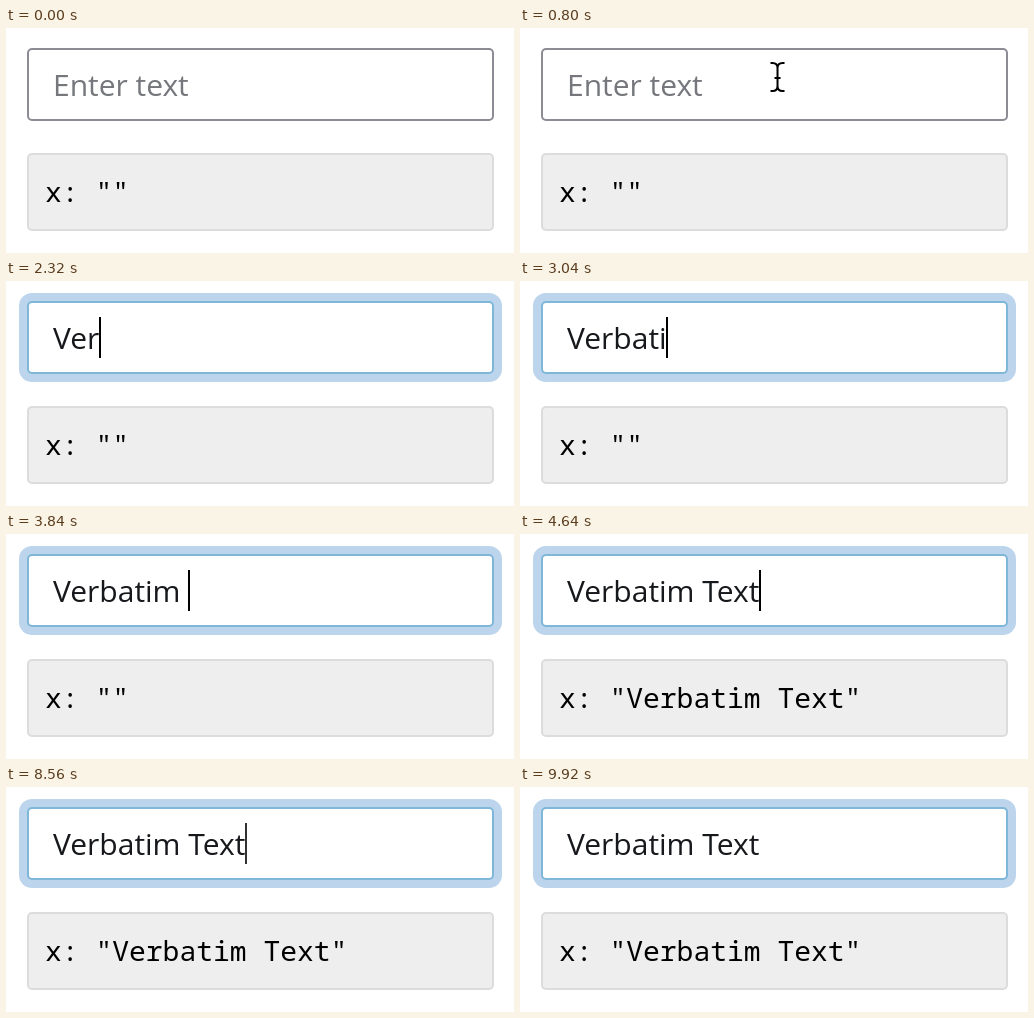
An HTML page with a canvas for the animation above (10 s loop, 508 by 225 pixels).

```html
<!DOCTYPE html>
<html lang="en">
<head>
<meta charset="utf-8">
<title>Text input demo</title>
<style>
  html, body { margin: 0; width: 100%; height: 100%; overflow: hidden; background: #fff; }
  canvas { display: block; }
</style>
</head>
<body>
<canvas id="stage" width="508" height="225"></canvas>
<script>
const c = document.getElementById('stage').getContext('2d');
const LOOP = 10000, TEXT = 'Verbatim Text';
const KEYS = [1920, 2080, 2240, 2400, 2640, 2880, 3040, 3280, 3520, 3920, 4080, 4160, 4320];
const FOCUS = 1270, OUTPUT = 4560, LEFT = 47;
const SANS = '30px "Open Sans", "Noto Sans", sans-serif';
const MONO = '28px "Noto Sans Mono", "DejaVu Sans Mono", monospace';

const clamp = v => Math.max(0, Math.min(1, v));
const ramp = (t, start, end) => clamp((t - start) / (end - start));
const smooth = p => p * p * (3 - 2 * p);
const mix = (a, b, p) => a.map((v, i) => Math.round(v + (b[i] - v) * p));
const bezier = (p, a, b, d, e) => {
  const q = 1 - p;
  return q * q * q * a + 3 * q * q * p * b + 3 * q * p * p * d + p * p * p * e;
};

function box(x, y, w, h, r, fill) {
  c.fillStyle = fill;
  c.beginPath();
  c.roundRect(x, y, w, h, r);
  c.fill();
}

function framed(y, h, border, fill) {
  box(21, y, 467, h, 5, border);
  box(23, y + 2, 463, h - 4, 3, fill);
}

function write(text, x, y, font, color) {
  c.font = font;
  c.fillStyle = color;
  c.fillText(text, x, y);
}

// Caret stays solid while typing, then fades out and in every 1200 ms
function caretAlpha(t) {
  if (t < 4900) return 1;
  const u = (t - 4940) % 1200;
  return u < 0 ? 1 : 1 - ramp(u, 0, 110) + ramp(u, 520, 730);
}

function outline(path, width) {
  c.lineJoin = 'round';
  c.strokeStyle = '#fff';
  c.lineWidth = width + 2;
  c.stroke(path);
  c.strokeStyle = '#000';
  c.lineWidth = width;
  c.stroke(path);
}

const beam = new Path2D('M-7-14H-5Q0-14 0-9V9Q0 14-5 14H-7M7-14H5Q0-14 0-9M0 9Q0 14 5 14H7M-3 1H3');
const arrow = new Path2D('M0 0V31L7 24.500L12 36L17 34L12 22.500H22Z');

function pointer(t) {
  if (t < 320 || t >= KEYS[0]) return;
  const p = smooth(ramp(t, 240, 1120));
  const x = bezier(p, 395, 350, 200, 270), y = bezier(p, 240, 80, 10, 67);
  c.save();
  c.translate(x, y);
  if ((y > 20 && y < 93) || (y > 125 && y < 203)) {
    outline(beam, 2);
  } else {
    outline(arrow, 2);
    c.fillStyle = '#000';
    c.fill(arrow);
  }
  c.restore();
}

function draw(t) {
  c.fillStyle = '#fff';
  c.fillRect(0, 0, 508, 225);

  const f = smooth(ramp(t, FOCUS, FOCUS + 160)), s = 8 * f;
  if (f) box(21 - s, 20 - s, 467 + 2 * s, 73 + 2 * s, 5 + s, `rgba(188,213,236,${f})`);
  framed(20, 73, `rgb(${mix([140, 140, 149], [127, 183, 217], f)})`, '#fff');
  framed(125, 78, '#dcdcdc', '#eee');

  const typed = TEXT.slice(0, KEYS.filter(k => k <= t).length);
  write(typed || 'Enter text', LEFT, 68, SANS, typed ? '#16181b' : '#75777c');
  if (t >= FOCUS) {
    c.globalAlpha = clamp(caretAlpha(t));
    c.fillStyle = '#000';
    c.fillRect(Math.round(LEFT + c.measureText(typed).width - 0.5), 36, 2, 41);
    c.globalAlpha = 1;
  }
  write(`x: "${t >= OUTPUT ? TEXT : ''}"`, 39, 174, MONO, '#000');
  pointer(t);
}

const start = performance.now();
function tick() {
  draw((performance.now() - start) % LOOP);
  requestAnimationFrame(tick);
}
tick();
</script>
</body>
</html>
```
